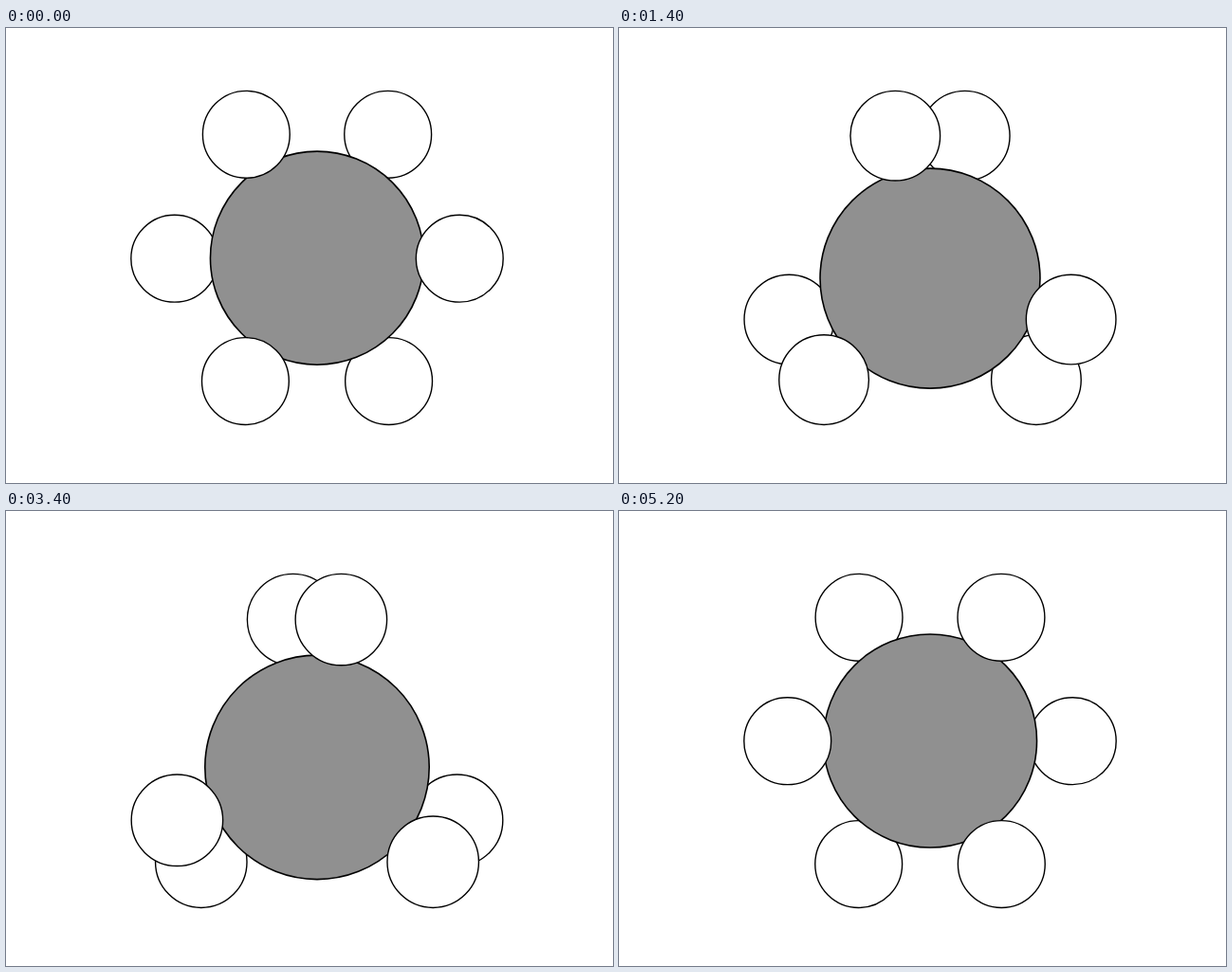
These frames come from a looping animation (640 by 480 pixels, 5.4 s). An HTML page:

```html
<!DOCTYPE html>
<html lang="en">
<head>
<meta charset="utf-8">
<title>Trigonal twist</title>
<style>
  html, body { margin: 0; width: 100%; height: 100%; overflow: hidden; background: #fff; }
  svg { display: block; width: 640px; height: 480px; }
  circle { fill: #fff; stroke: #000; stroke-width: 1.4; }
  #core { fill: #909090; stroke-width: 1.6; }
</style>
</head>
<body>
<svg viewBox="0 0 640 480">
  <g id="back"><circle/><circle/><circle/></g>
  <circle id="core"/>
  <g id="front"><circle/><circle/><circle/></g>
</svg>
<script>
const STEP = 200, STEPS = 27;
const START = 29.8, TURN = 2.297;          // twist in degrees: first pose, change per step
const BOND = 150.2, BALL = 45.9, CORE = 112.5;
const CX = 328, TOP = 66.35, HEIGHT = 352.1;

const core = document.getElementById('core');
const back = document.querySelectorAll('#back circle');
const front = document.querySelectorAll('#front circle');
const rad = deg => deg * Math.PI / 180;

function place(el, x, y, r) {
  el.setAttribute('cx', x.toFixed(2));
  el.setAttribute('cy', y.toFixed(2));
  el.setAttribute('r', r.toFixed(2));
}

function draw(step) {
  const twist = START - TURN * step;
  // The figure is scaled so that its overall height stays constant.
  const span = Math.sqrt(3) * BOND * Math.cos(rad(30 - Math.abs(twist))) + 2 * BALL;
  const scale = HEIGHT / span;
  const bond = BOND * scale, ball = BALL * scale;
  const cy = TOP + ball + bond * Math.cos(rad(twist));

  const ring = (balls, turn) => balls.forEach((el, i) => {
    const angle = rad(90 + 120 * i + turn);
    place(el, CX + bond * Math.cos(angle), cy - bond * Math.sin(angle), ball);
  });
  ring(back, -twist);
  place(core, CX, cy, CORE * scale);
  ring(front, twist);
}

let shown = -1;
function tick() {
  const step = Math.floor(performance.now() / STEP) % STEPS;
  if (step !== shown) draw(shown = step);
  requestAnimationFrame(tick);
}
tick();
</script>
</body>
</html>
```
